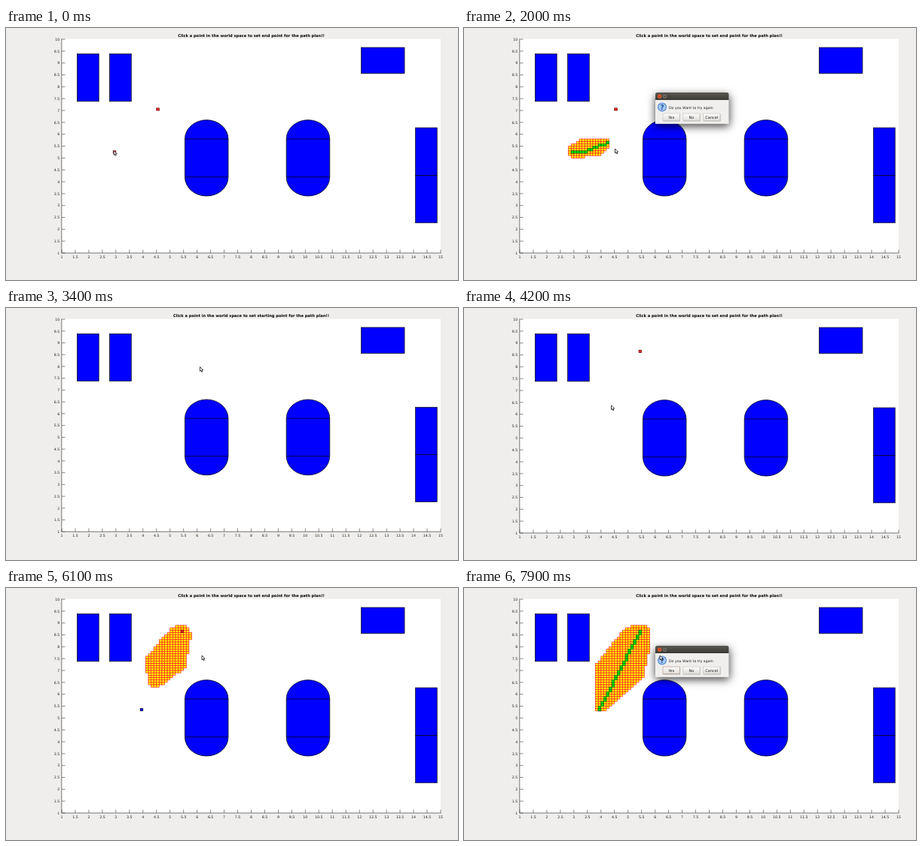
Write an HTML page with a canvas that moves like this. It is 600 px wide and 336 px high and loops after 8000 ms.

```html
<!DOCTYPE html>
<html lang="en">
<head>
<meta charset="utf-8">
<title>Path planning</title>
<style>
  html, body { margin: 0; width: 100%; height: 100%; overflow: hidden; background: #efeeec; }
  canvas { display: block; width: 100vw; height: 100vh; }
</style>
</head>
<body>
<canvas id="stage" width="600" height="336"></canvas>
<script>
const ctx = document.getElementById('stage').getContext('2d');
const LOOP = 8000;
const FONT = '"DejaVu Sans", sans-serif';
const LEFT = 74, RIGHT = 577, TOP = 15, BOTTOM = 300;
const toX = v => LEFT + (v - 1) * (RIGHT - LEFT) / 14;
const toY = v => BOTTOM - (v - 1) * (BOTTOM - TOP) / 9;
const clamp = v => Math.max(0, Math.min(1, v));
const progress = (t, from, to) => clamp((t - from) / (to - from));

// A* on a grid of 0.1 units: cells in order of discovery, path from goal to start.
function search(start, goal) {
  const cells = [], index = new Map();
  const cellAt = (x, y) => {
    const key = x * 1000 + y;
    if (!index.has(key)) {
      const cell = { x, y, g: Infinity, f: Infinity };
      index.set(key, cell);
      cells.push(cell);
    }
    return index.get(key);
  };
  const relax = (cell, g, parent) => {
    if (g >= cell.g - 1e-9) return;
    cell.g = g;
    cell.f = g + Math.hypot(cell.x - goal.x, cell.y - goal.y);
    cell.parent = parent;
  };
  relax(cellAt(start.x, start.y), 0, null);
  for (;;) {
    let node = null;
    for (const c of cells) if (!c.closed && (!node || c.f < node.f - 1e-9)) node = c;
    node.closed = true;
    if (node.x === goal.x && node.y === goal.y) {
      const path = [];
      for (let c = node; c; c = c.parent) path.push(c);
      return { cells, path };
    }
    for (let dx = -1; dx <= 1; dx++)
      for (let dy = -1; dy <= 1; dy++)
        if (dx || dy) relax(cellAt(node.x + dx, node.y + dy), node.g + Math.hypot(dx, dy), node);
  }
}

const plan = (start, goal, times) => ({ start, goal, ...times, ...search(start, goal) });
const plans = [
  plan({ x: 29, y: 52 }, { x: 42, y: 56 },
    { startAt: 0, goalAt: 600, from: 750, to: 1300, pathFrom: 1330, pathTo: 1500 }),
  plan({ x: 54, y: 86 }, { x: 39, y: 53 },
    { startAt: 3900, goalAt: 4400, from: 4450, to: 7220, pathFrom: 7250, pathTo: 7500 })
];

const cursorKeys = [
  [0, 143, 163.5], [100, 143, 163.5], [600, 191, 152], [1300, 191, 152], [1700, 200.5, 161],
  [2100, 200.5, 161], [2600, 270.5, 104.5], [3050, 270.5, 104.5], [3350, 257.5, 78.5],
  [3450, 257.5, 78.5], [3850, 234, 57], [3950, 234, 57], [4350, 178, 163],
  [5250, 178, 163], [5650, 260, 90], [8000, 260, 90]
];

function cursorAt(t) {
  const i = Math.max(1, cursorKeys.findIndex(k => k[0] > t));
  const [t0, x0, y0] = cursorKeys[i - 1], [t1, x1, y1] = cursorKeys[i];
  const p = progress(t, t0, t1), e = p * p * (3 - 2 * p);
  return [x0 + (x1 - x0) * e, y0 + (y1 - y0) * e];
}

function box(x, y, w, h, fill, stroke, lineWidth = 0.7) {
  ctx.fillStyle = fill;
  ctx.fillRect(x, y, w, h);
  if (!stroke) return;
  ctx.strokeStyle = stroke;
  ctx.lineWidth = lineWidth;
  ctx.strokeRect(x, y, w, h);
}

function disc(x, y, r, fill) {
  ctx.fillStyle = fill;
  ctx.beginPath();
  ctx.arc(x, y, r, 0, 2 * Math.PI);
  ctx.fill();
}

function line(x0, y0, x1, y1, color, width = 0.7) {
  ctx.strokeStyle = color;
  ctx.lineWidth = width;
  ctx.beginPath();
  ctx.moveTo(x0, y0);
  ctx.lineTo(x1, y1);
  ctx.stroke();
}

function label(text, x, y, size, align = 'center', color = '#222', weight = '') {
  ctx.font = `${weight} ${size}px ${FONT}`;
  ctx.textAlign = align;
  ctx.fillStyle = color;
  ctx.fillText(text, x, y);
}

function gradient(x0, y0, x1, y1, ...colors) {
  const g = ctx.createLinearGradient(x0, y0, x1, y1);
  colors.forEach((c, i) => g.addColorStop(i / (colors.length - 1), c));
  return g;
}

function cell({ x, y }, fill, stroke) {
  box(toX(x / 10), toY((y + 1) / 10), toX(1.1) - LEFT, BOTTOM - toY(1.1), fill, stroke);
}

function capsule(x) {
  const cx = toX(x), rx = 28.8, ry = 25.4, y0 = toY(5.8), y1 = toY(4.2);
  ctx.beginPath();
  ctx.ellipse(cx, y0, rx, ry, 0, Math.PI, 2 * Math.PI);
  ctx.ellipse(cx, y1, rx, ry, 0, 0, Math.PI);
  ctx.closePath();
  ctx.fillStyle = '#00f';
  ctx.fill();
  ctx.strokeStyle = '#000';
  ctx.lineWidth = 0.7;
  ctx.stroke();
  for (const y of [y0, y1]) line(cx - rx, y, cx + rx, y, '#000');
}

function drawAxes(title) {
  box(0, 0, 600, 336, '#efeeec');
  box(LEFT, TOP - 0.5, RIGHT - LEFT, BOTTOM - TOP + 0.5, '#fff');
  line(LEFT - 0.2, TOP - 0.5, LEFT - 0.2, BOTTOM + 0.5, '#555', 0.8);
  line(LEFT, BOTTOM, RIGHT + 0.5, BOTTOM, '#555', 0.8);
  for (let v = 1; v <= 15; v += 0.5) {
    line(toX(v), BOTTOM, toX(v), BOTTOM - 4.5, '#555');
    label(v, toX(v), BOTTOM + 6.7, 4.7);
    if (v > 10) continue;
    line(LEFT, toY(v), LEFT + 4.5, toY(v), '#555');
    label(v, 71.3, toY(v) + 1.8, 4.7, 'right');
  }
  label(`Click a point in the world space to set ${title} point for the path plan!!`,
    325.5, 12, 5.15, 'center', '#000', 'bold');
}

function drawObstacles() {
  const blocks = [[94.5, 34.5, 28.7, 63.3], [137.6, 34.5, 28.7, 63.3], [471.5, 26, 57.5, 34.6],
    [543.5, 133, 28.7, 63.4], [543.5, 196.4, 28.7, 63.4]];
  for (const b of blocks) box(...b, '#00f', '#000');
  capsule(6.35);
  capsule(10.1);
}

function drawPlan(p, t) {
  const shown = Math.round(p.cells.length * progress(t, p.from, p.to));
  p.cells.slice(0, shown).forEach(c => cell(c, '#ff0', '#f22'));
  if (t >= p.startAt) cell(p.start, '#f02a1a', '#601');
  if (t >= p.goalAt) cell(p.goal, '#00f', '#002');
  const steps = Math.round(p.path.length * progress(t, p.pathFrom, p.pathTo));
  p.path.slice(0, steps).forEach(c => cell(c, '#0e0', '#176b00'));
}

function drawDialog(y, opacity, focused) {
  ctx.save();
  ctx.globalAlpha = opacity;
  ctx.translate(254, y);
  ctx.save();
  ctx.shadowColor = 'rgba(0,0,0,.75)';
  ctx.shadowBlur = 11;
  ctx.shadowOffsetY = 3;
  box(0, 1, 97.5, 40.8, '#f0efed');
  ctx.restore();
  ctx.beginPath();
  ctx.roundRect(0, 0, 97.5, 10, [2.5, 2.5, 0, 0]);
  ctx.fillStyle = gradient(0, 0, 0, 10, '#5a5852', '#3b3a36');
  ctx.fill();
  disc(5.6, 5.2, 2.6, '#e8592a');
  line(4.6, 4.2, 6.6, 6.2, '#5a2410', 0.6);
  line(6.6, 4.2, 4.6, 6.2, '#5a2410', 0.6);
  disc(12.5, 5.2, 2.5, '#77746c');
  disc(12.5, 5.2, 1.2, '#4b4943');
  disc(9, 19.5, 6, '#4d83cf');
  disc(9, 19.5, 4.9, '#a9caf2');
  label('?', 9, 23, 9.5, 'center', '#2456a8', 'bold');
  label('Do you Want to try again', 18, 21.8, 4.7, 'left');
  ['Yes', 'No', 'Cancel'].forEach((text, i) => {
    const x = 10 + i * 26.8;
    box(x + 0.5, 28.7, 22.5, 9.8, '#b5b3af');
    box(x, 28, 22.3, 9.7, gradient(0, 28, 0, 38, '#fcfcfb', '#dedcd9'),
      focused && !i ? '#b08c78' : '#c4c2be', 0.6);
    label(text, x + 11.2, 34.8, 5);
  });
  ctx.restore();
}

function drawPlayer(t) {
  box(0, 0, 600, 336, gradient(0, 0, 0, 336, '#2b5a61', '#28474c', '#5c6258', '#45605f', '#7d7c68'));
  const glow = ctx.createRadialGradient(584, 224, 1, 584, 224, 24);
  glow.addColorStop(0, '#c8b58c');
  glow.addColorStop(1, 'rgba(120,110,90,0)');
  box(567, 195, 33, 60, glow);
  line(574, 63, 587, 52, '#f0804a', 3);
  line(576, 61, 586, 53, '#ffd9a0', 1.2);
  line(589, 59, 596, 54, '#f0a060', 1.5);
  line(595, 100, 600, 91, '#e08a50', 2.5);
  line(594, 130, 600, 122, '#d09050', 2);

  box(0, 324, 121, 12, gradient(0, 0, 121, 0, '#8c6a4a', '#d9a45c', '#b98a58'));
  box(121, 324, 50, 12, '#d8d6d2');
  box(171, 324, 275, 12, '#f6f5f4');
  box(446, 324, 121, 12, gradient(446, 0, 567, 0, '#1d3034', '#3a4a48', '#574b40'));
  box(124.5, 332, 6, 4, '#555');
  label('PHD', 133, 336.5, 5.5, 'left', '#444');

  box(0, 0, 567, 306, '#000');
  box(0, 306, 567, 18, gradient(0, 306, 0, 324, '#f3f2f1', '#e2e0de'));
  box(5, 307.5, 546, 2.4, '#cfcdca', '#b5b3b0', 0.5);
  label('--:--', 560, 310.5, 4, 'center', '#666');
  [5.5, 14.5, 23.5, 37, 46, 59.5, 68.5, 77.5].forEach((x, i) => {
    box(x, 313.5, 8.5, 9, '#f5f4f3', '#bbb', 0.6);
    if (i === 1) box(x + 2.5, 316.2, 3.5, 3.5, '#444');
    else if (i === 0 || i === 2) {
      const s = i ? 1 : -1, cx = x + 4.2;
      line(cx + 2.5 * s, 316, cx + 2.5 * s, 320, '#444', 0.9);
      for (const d of [-2.5, 0]) {
        ctx.fillStyle = '#444';
        ctx.beginPath();
        ctx.moveTo(cx + d * s, 316);
        ctx.lineTo(cx + (d + 2.5) * s, 318);
        ctx.lineTo(cx + d * s, 320);
        ctx.fill();
      }
    } else for (const d of [0, 2, 4]) line(x + 2, 316 + d, x + 6.5, 316 + d, '#555', 0.8);
  });
  box(526, 319, 2, 3, '#666');
  disc(529, 320.5, 1.8, '#e08030');
  label('100%', 538, 318.5, 3.8, 'center', '#666');
  ctx.beginPath();
  ctx.moveTo(533, 322.5);
  ctx.lineTo(558, 315.5);
  ctx.lineTo(558, 322.5);
  ctx.closePath();
  ctx.fillStyle = '#ddd';
  ctx.fill();
  ctx.strokeStyle = '#888';
  ctx.lineWidth = 0.5;
  ctx.stroke();
  for (let x = 535; x < 554; x += 2) box(x, 322.3 - (x - 533) * 0.27, 1.4, (x - 533) * 0.27, '#2db82d');

  disc(278, 147, 19.5, '#f58a1f');
  box(256.5, 97, 93, 30, `rgba(240,239,237,${0.37 * (1 - progress(t, 3030, 3150))})`);
}

function drawCursor(t) {
  const [x, y] = cursorAt(t);
  ctx.save();
  ctx.translate(x, y);
  ctx.beginPath();
  [[0, 0], [0, 5.8], [1.4, 4.6], [2.3, 6.8], [3.3, 6.3], [2.4, 4.3], [4.2, 4.2]]
    .forEach(p => ctx.lineTo(...p));
  ctx.closePath();
  ctx.fillStyle = '#fff';
  ctx.fill();
  ctx.strokeStyle = '#111';
  ctx.lineWidth = 0.8;
  ctx.stroke();
  ctx.restore();
}

function drawFigure(t) {
  const second = t >= 3200, picking = second && t < 3900;
  box(0, 0, 600, 336, '#efeeec');
  ctx.save();
  if (picking) {
    ctx.translate(0, TOP);
    ctx.scale(1, 283.3 / 285);
    ctx.translate(0, -TOP);
  }
  drawAxes(picking ? 'starting' : 'end');
  drawObstacles();
  if (!second) cell({ x: 45, y: 70 }, '#f02a1a', '#601');
  drawPlan(plans[second ? 1 : 0], t);
  ctx.restore();
  if (!second && t >= 1650) drawDialog(86, progress(t, 1600, 1750), false);
  if (t >= 7650) drawDialog(77, progress(t, 7600, 7750), true);
}

function draw(t) {
  if (t >= 2900 && t < 3200) drawPlayer(t);
  else drawFigure(t);
  drawCursor(t);
}

function tick() {
  draw(performance.now() % LOOP);
  requestAnimationFrame(tick);
}
tick();
</script>
</body>
</html>
```
